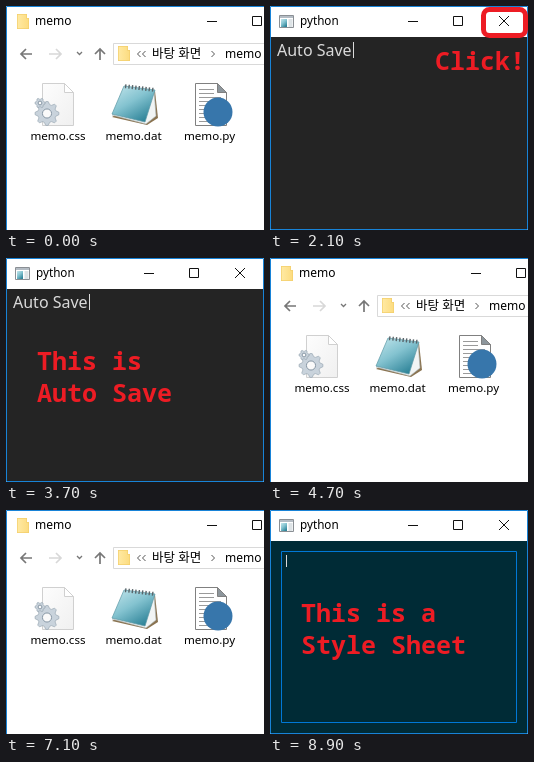
An HTML page for the animation above (9900 ms loop, 258 px wide and 224 px high).

```html
<!DOCTYPE html>
<html lang="ko">
<head>
<meta charset="utf-8">
<title>memo</title>
<style>
  html, body { margin: 0; width: 100%; height: 100%; overflow: hidden; background: #fff; }
  svg { display: block; width: 100vw; height: 100vh; }
  text { font: 12px "Noto Sans", "Noto Sans CJK KR", sans-serif; white-space: pre; }
  .label { font-size: 11.6px; text-anchor: middle; }
  .css { font: 12.6px "Liberation Sans", sans-serif; }
  .memo { font-size: 16px; font-weight: 300; fill: #dadada; }
  .small { font-size: 12px; }
  .note { font: bold 25px "Noto Sans Mono", monospace; fill: #ed1c24; }
  .mark { fill: none; stroke: #ed1c24; }
</style>
</head>
<body>
<svg id="stage" viewBox="0 0 258 224">
  <defs>
    <linearGradient id="gold" x2="1"><stop stop-color="#ffe9a2"/><stop offset="1" stop-color="#fcdc80"/></linearGradient>
    <linearGradient id="teal" x2=".7" y2="1"><stop stop-color="#c4e6ec"/><stop offset=".5" stop-color="#84c3d0"/><stop offset="1" stop-color="#2f8499"/></linearGradient>
    <linearGradient id="paper" x2="1" y2="1"><stop stop-color="#fdfdfd"/><stop offset="1" stop-color="#f0f0f0"/></linearGradient>
    <g id="folder">
      <path d="M0 0H10V4H12V15H0Z" fill="#f3cf6c"/>
      <path d="M.7.7H9.3V4.7H11.3V14.3H.7Z" fill="url(#gold)"/>
    </g>
    <path id="page" d="M.5.5H22.5L31.5 9.5V42.5H.5Z"/>
    <path id="fold" d="M22.5.5V9.5H31.5Z"/>
    <g id="app">
      <path d="M.5.5h14v12H.5z" fill="#fff" stroke="#8a8f94"/>
      <path d="M1 1h13v2H1z" fill="#b4bcc4"/>
      <path d="M2 4h6v8H2z" fill="url(#teal)"/>
      <path d="M9.5 4h4v8h-4z" fill="#dde3e6"/>
    </g>
    <g id="pad">
      <path d="M44 8L47 35 36 42 1 34Z" fill="#8a7350"/>
      <path d="M43 7L45 33 35 41 1 32Z" fill="#f1f4f4" stroke="#a9b4b6" stroke-width=".6"/>
      <path d="M13 3L44 7 34 39 1 31Z" fill="url(#teal)" stroke="#5c98a5" stroke-width=".7"/>
      <path d="M14 3.2L44 7" fill="none" stroke="#59656a" stroke-width="4" stroke-dasharray="1.4 2"/>
    </g>
  </defs>
  <g id="scene"></g>
</svg>
<script>
const LOOP = 9900, MEMO = 'Auto Save', BLUE = '#1883d7';
const scene = document.getElementById('scene');

const text = (x, y, s, cls = '', extra = '') => `<text x="${x}" y="${y}" class="${cls}" ${extra}>${s}</text>`;
const rect = (x, y, w, h, fill, extra = '') => `<rect x="${x}" y="${y}" width="${w}" height="${h}" fill="${fill}" ${extra}/>`;
const line = (d, color, width = 1) => `<path d="${d}" fill="none" stroke="${color}" stroke-width="${width}"/>`;
const icon = (id, x, y, extra = '', scale = 1) =>
  `<use href="#${id}" transform="translate(${x} ${y}) scale(${scale})" ${extra}/>`;
const note = (x, y, s) => text(x, y, s, 'note');
const mark = (x, y, w, h, r, width) =>
  `<rect class="mark" x="${x}" y="${y}" width="${w}" height="${h}" rx="${r}" stroke-width="${width}"/>`;

function gear(x, y, r, teeth) {
  let d = '';
  for (let i = 0; i < teeth * 4; i++) {
    const a = (i - 0.5) / teeth * Math.PI / 2, k = i % 4 < 2 ? r : r * 0.77;
    d += `${i ? 'L' : 'M'}${(x + k * Math.cos(a)).toFixed(1)} ${(y + k * Math.sin(a)).toFixed(1)}`;
  }
  return `<path d="${d}Z" fill="#c9d3dc" stroke="#9aa8b4" stroke-width=".7"/>
    <circle cx="${x}" cy="${y}" r="${r * 0.38}" fill="#fafafa" stroke="#8797a5"/>`;
}

function explorer(t, target, word) {
  const css = target === 'css';
  let codeLines = '';
  for (let i = 0; i < 9; i++)
    codeLines += line(`M193 ${83.5 + i * 4}h${i < 2 ? 15 : 22}`, '#9a9a9a');
  let out = rect(0, 0, 258, 224, '#fff') + line('M.5 224V.5H258', BLUE)
    + icon('folder', 11, 8) + text(29, 19, 'memo')
    + line('M201 15.5h10M246.5 10.5h9v9h-9z', '#111')
    + line('M26 48H15M20 43l-5 5 5 5', '#777', 1.7)
    + line('M43 48h12M50 43l5 5-5 5', '#d8d8d8', 1.7)
    + line('M71 46l2.5 2.5 2.5-2.5', '#777', 1.3)
    + line('M94 54V43M89 48l5-5 5 5', '#777', 1.7)
    + line('M258 37.5H107.5V58.5H258', '#d9d9d9')
    + icon('folder', 112, 40)
    + line('M134.5 45l-3 3 3 3M139.5 45l-3 3 3 3', '#555')
    + text(146, 52, '바탕 화면', '', 'style="font-size:12.5px"')
    + line('M205.5 45l3 3-3 3', '#555') + text(219, 52, 'memo')
    + icon('page', 36, 77, 'fill="url(#paper)" stroke="#d0d0d0"')
    + icon('fold', 36, 77, 'fill="#fff" stroke="#d0d0d0"')
    + gear(41, 107.5, 12, 8) + gear(34, 97, 5, 6)
    + icon('pad', 105, 77)
    + icon('page', 189, 77, 'fill="#fff" stroke="#808080"')
    + icon('fold', 189, 77, 'fill="#8d969c" stroke="#808080"') + codeLines
    + '<circle cx="212" cy="106" r="14.5" fill="#3776ab"/>'
    + text(52, 133.5, 'memo.css', 'label') + text(127.5, 133.5, 'memo.dat', 'label') + text(203.5, 133.5, 'memo.py', 'label');
  if (target && t >= 300) out += mark(css ? 13.5 : 168.5, 66.5, 73, 79, 12, 5);
  if (target && t >= 600) out += note(css ? 20 : 147, css ? 175 : 172, word);
  return out;
}

const frame = (title, image) => rect(0, 0, 258, 224, '#fff')
  + image + text(30, 19, title, '', 'style="font-size:11.7px"')
  + line('M138 15.5h10M183.5 10.5h9v9h-9zM229 10l10 10M239 10l-10 10', '#111')
  + line('M.5.5h257v223H.5z', BLUE);

function python(typed, caret, styled) {
  const [x, y, h] = styled ? [16, 45, 12] : [7, 36, 16];
  return frame('python', icon('app', 9, 9)) + rect(1, 31, 256, 192, styled ? '#002b36' : '#242424')
    + (styled ? line('M11.5 41.5h235v171h-235z', '#0078d7') : '')
    + text(x, styled ? 56 : 50, typed, styled ? 'memo small' : 'memo', 'id="typed"')
    + (caret ? rect(x, y, 1, h, '#dadada', 'id="caret"') : '');
}

function notepad(t) {
  const edited = t >= 900;
  const rows = edited
    ? ['background-color:rgb(0, 43, 54);', 'color:rgb(218, 218, 218);', 'font-size:9pt;', 'border:1px solid rgb(0, 120, 215);', 'margin:10px;']
    : ['background-color:rgb(36, 36, 36);', 'color:rgb(218, 218, 218);', 'font-size:12pt;'];
  let out = frame('memo.css - 메...', icon('pad', 9, 8, '', 0.33))
    + text(8, 45, '파일(F)') + text(60, 45, '편집(E)') + text(112, 45, '서식(O)') + text(167, 45, '보기(V)')
    + text(8, 64, '도움말(H)') + line('M1 68.5h256', '#d8d8d8')
    + rect(241, 69, 16, 154, '#f0f0f0')
    + line('M245.5 79.5l3.5-3.5 3.5 3.5M245.5 213l3.5 3.5 3.5-3.5', '#b8b8b8', 1.8)
    + rows.map((s, i) => text(1, 80.5 + i * 13, s, 'css')).join('');
  if (!edited) out += rect(1, 109, 1, 12, '#000');
  if (!edited && t >= 300)
    out += line('M121 82.5H192M52 96H134', '#ed1c24', 3) + mark(3, 108, 56.5, 19.5, 5, 3);
  if (!edited && t >= 600) out += note(20, 168, 'Modify');
  if (t >= 1200) out += note(71, 202, 'Save');
  return out;
}

function picture(t) {
  if (t < 900) return explorer(t, 'py', 'Execute');
  if (t < 2400) return python(MEMO.slice(0, Math.floor((t - 900) / 100)), true)
    + (t >= 2100 ? mark(213.5, 3.5, 42, 26, 6, 5) + note(165, 64, 'Click!') : '');
  if (t < 3300) return explorer(t - 2400, 'py', 'Execute');
  if (t < 4700) return python(MEMO, t >= 3400)
    + (t >= 3700 ? note(31, 112, 'This is') + note(31, 144, 'Auto Save') : '');
  if (t < 5600) return explorer(t - 4700, 'css', 'Open');
  if (t < 7100) return notepad(t - 5600);
  if (t < 8000) return explorer(t - 7100, 'py', 'Execute');
  const left = Math.max(0, MEMO.length - Math.floor((t - 8000) / 100));
  return python(MEMO.slice(0, left), true, true)
    + (t >= 8900 ? note(31, 112, 'This is a') + note(31, 144, 'Style Sheet') : '');
}

let shown = '';
const start = performance.now();
function tick() {
  const markup = picture((performance.now() - start) % LOOP);
  if (markup !== shown) {
    scene.innerHTML = shown = markup;
    const caret = document.getElementById('caret');
    const typed = document.getElementById('typed');
    if (caret && typed.textContent)
      caret.setAttribute('x', Math.round(+typed.getAttribute('x') + typed.getComputedTextLength()) + 1);
  }
  requestAnimationFrame(tick);
}
tick();
</script>
</body>
</html>
```
